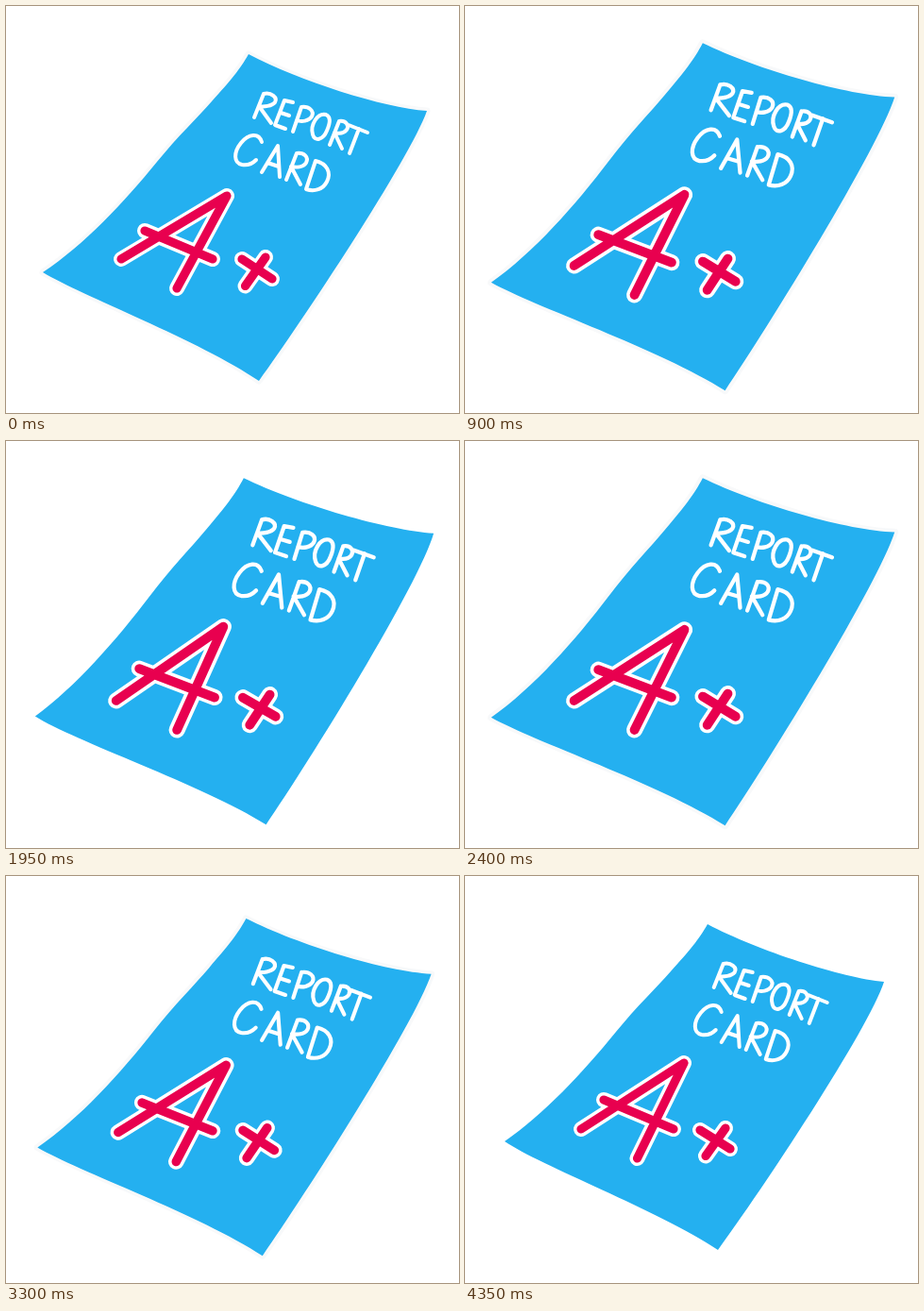
An HTML page with a canvas for the animation above (4500 ms loop, 480 px wide and 431 px high).

```html
<!DOCTYPE html>
<html lang="en">
<head>
<meta charset="utf-8">
<title>Report card</title>
<style>
html, body { margin: 0; width: 100%; height: 100%; overflow: hidden; background: #fff; }
canvas { display: block; width: 480px; height: 431px; }
</style>
</head>
<body>
<canvas id="stage" width="480" height="431"></canvas>
<script>
const ctx = document.getElementById('stage').getContext('2d');
const BLUE = '#24b0f0', RED = '#e8004f', WHITE = '#fff', EDGE = '#f8f9fa';
const STEP = 150;
const STEPS = 10;
const PIVOT = [243, 225];

// Two drawings of the same card alternate on every step.
const drawings = [
  {
    edge: true, top: '257 51', right: '446 111', bottom: '268 397', left: '39 282',
    grade: 'M122 268L234 201L181 299M147 238L219 268',
    plus: 'M275 266L253.5 296.5M250 268L282 289',
    shift: 0
  },
  {
    edge: false, top: '257 51', right: '444 112', bottom: '268 396', left: '42 281',
    grade: 'M123 268L232 198L182.5 299M147 237L221 268',
    plus: 'M276 267L255 296.5M249 269L281 289',
    shift: 0.7
  }
];

for (const d of drawings) {
  d.paper = new Path2D(`M${d.top} C310 79 400 108 ${d.right}
    C428 162 313 335 ${d.bottom}
    C205 354 80 307 ${d.left}
    C83 253 125 208 160 165 C182 138 204 117 218 101 C238 79 248 67 ${d.top}Z`);
  d.mark = new Path2D(d.grade + d.plus);
}

const title = new Path2D([
  // REPORT
  'M273 93L263 118M273 93C281 91 288 97 285 102C282 106 273 107 268 106L281 124',
  'M304 102L295 100L285 126L296 130M291 113L300 116',
  'M313 107L304 133M313 107C321 106 327 111 324 117C321 122 313 123 308 121',
  'M339 115C330 113 322 126 325 136C327 144 336 142 340 132C344 123 344 117 339 115Z',
  'M353 122L343 147M353 122C360 121 364 126 361 131C358 135 352 135 348 134L356 151',
  'M363 126L383 134M374 130L364 156',
  // CARD
  'M271 144C268 134 257 135 249 145C241 155 241 166 250 168C256 169 261 167 265 163',
  'M271 176L288 148L290 181M277 166L289 170',
  'M308 156L297 184M308 156C316 155 321 160 318 166C315 171 307 171 302 170L312 189',
  'M328 164L318 194M328 164C340 167 345 176 340 186C336 194 327 197 318 194'
].join(''));

function stroke(path, color, width) {
  ctx.strokeStyle = color;
  ctx.lineWidth = width;
  ctx.stroke(path);
}

// Grow over three steps, hold for two, shrink, rest.
function growth(step) {
  const fromEnd = Math.min(step, STEPS - 1 - step);
  return Math.max(0, fromEnd - 1) / 3;
}

function draw(step) {
  const card = drawings[step % 2];
  const p = growth(step);
  const scale = 1 + 0.0975 * p;
  const turn = 0.052 * p;

  ctx.setTransform(1, 0, 0, 1, 0, 0);
  ctx.fillStyle = WHITE;
  ctx.fillRect(0, 0, 480, 431);
  ctx.translate(...PIVOT);
  ctx.transform(scale, -turn, turn, scale, 0, 0);
  ctx.translate(-PIVOT[0], -PIVOT[1]);
  ctx.lineCap = ctx.lineJoin = 'round';

  if (card.edge) stroke(card.paper, EDGE, 7);
  ctx.fillStyle = BLUE;
  ctx.fill(card.paper);

  stroke(card.mark, WHITE, 16);
  stroke(card.mark, RED, 9.2);

  ctx.translate(card.shift, 0);
  stroke(title, WHITE, 4);
}

function tick() {
  draw(Math.floor(performance.now() / STEP) % STEPS);
  requestAnimationFrame(tick);
}
tick();
</script>
</body>
</html>
```
